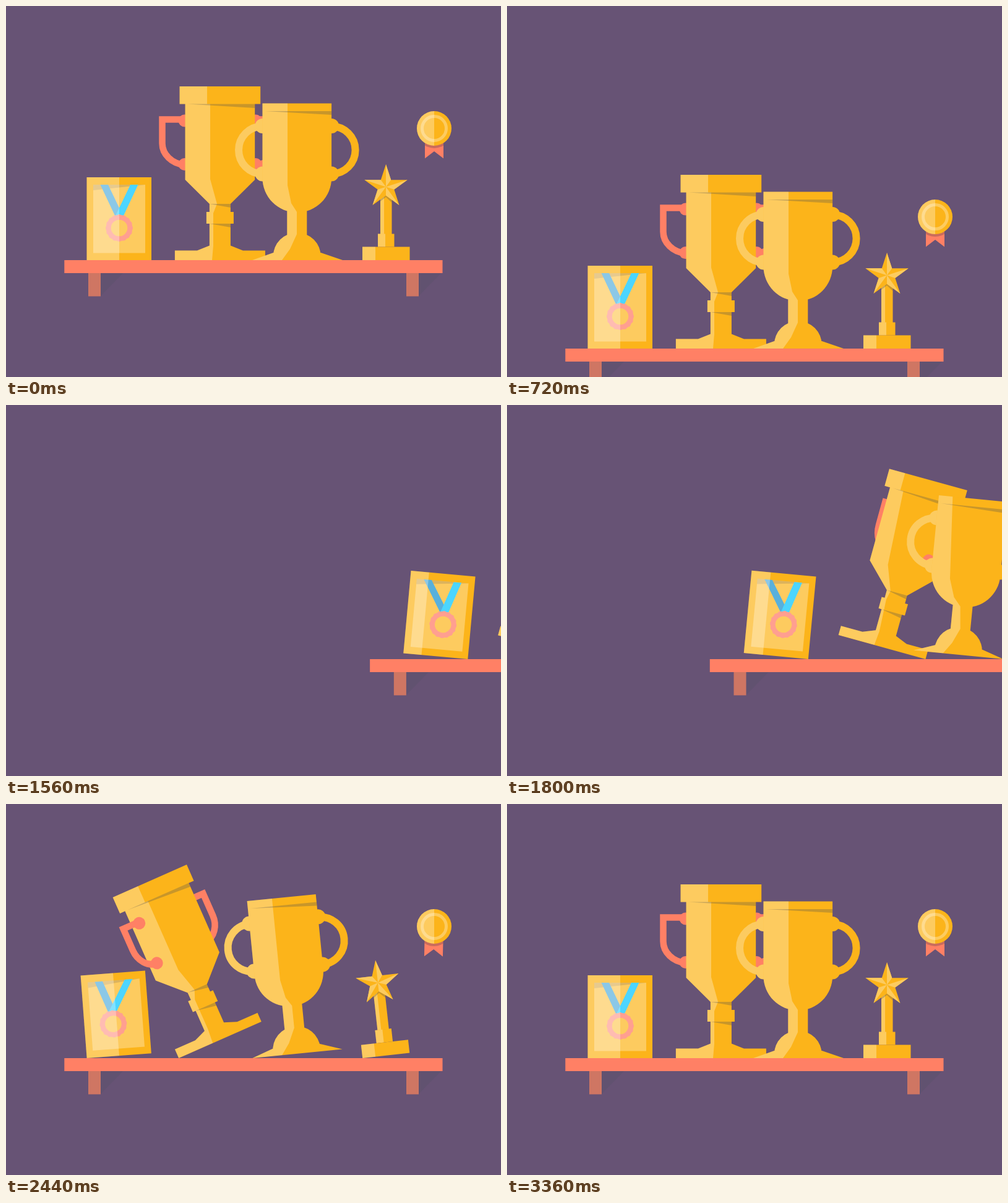
These frames come from a looping animation (800x600 px, 3400 ms). An HTML page with a canvas:

```html
<!DOCTYPE html>
<html lang="en">
<head>
<meta charset="utf-8">
<title>Trophy shelf</title>
<style>
html, body { margin: 0; width: 100%; height: 100%; overflow: hidden; background: #675375; }
canvas { display: block; }
</style>
</head>
<body>
<canvas id="stage" width="800" height="600"></canvas>
<script>
const ctx = document.getElementById('stage').getContext('2d');
const LOOP = 3400, STEP = 40, FLOOR = 411;
const BG = '#675375', GOLD = '#fcb41a', PALE = '#fccb60', CORAL = '#ff8065';
const GLOW = 'rgba(255,255,255,.3)', SHADE = 'rgba(80,80,80,.3)';
const TAU = Math.PI * 2, RAD = Math.PI / 180, SIDES = [-1, 1];

// Easing from (0,0) to (1,1) with level handles at x1 and x2
function ease(x1, x2) {
  return u => {
    let lo = 0, hi = 1;
    for (let i = 0; i < 24; i++) {
      const s = (lo + hi) / 2, r = 1 - s;
      if (3 * r * r * s * x1 + 3 * r * s * s * x2 + s ** 3 < u) lo = s; else hi = s;
    }
    return lo * lo * (3 - 2 * lo);
  };
}

const slideIn = ease(.53, .82), swing = ease(.42, .2);
const rock = ease(.6, .42), fall = ease(.3, .4), soft = ease(.4, .6);

const span = (t, a, b) => Math.min(1, Math.max(0, (t - a) / (b - a)));
const mix = (a, b, u) => a + (b - a) * u;

// Build up to a, cross over to b, then return to rest
function sway(t, a, b, cross, [c0, c1], back, [b0, b1]) {
  const start = a * soft(span(t, 1080, 1640));
  return mix(start, b, cross(span(t, c0, c1))) * (1 - back(span(t, b0, b1)));
}

function pose(t) {
  const drop = Math.max(0, t - 200) / STEP;
  if (t < 1000) {
    const still = { lean: 0, slide: 0 };
    return { x: 0, y: 12.85 * (Math.exp(.192 * drop) - 1), glow: 1, yaw: 0, hang: 0, tail: 0,
      frame: still, tall: still, round: still, star: still };
  }
  const item = (lean, slide, cross, when, back, rest, slideWhen = when) => ({
    lean: sway(t, lean[0], lean[1], cross, when, back, rest),
    slide: sway(t, slide, 0, cross, slideWhen, back, rest)
  });
  const late = span(t, 2000, 3360);
  return {
    x: 708 * (1 - slideIn(span(t, 1080, 2058))),
    y: 0,
    glow: mix(.56, 1, soft(span(t, 1680, 2360))),
    yaw: sway(t, 52, -41, soft, [2000, 2420], soft, [2640, 3300]),
    hang: 7 * Math.cos(late * TAU * 1.5) * Math.sqrt(1 - late),
    tail: sway(t, -24, 1.3, soft, [1900, 2320], soft, [2360, 3000]),
    frame: item([5.5, -5.6], 18.5, rock, [1760, 2330], fall, [2330, 2780], [1880, 2440]),
    tall: item([16, -24], 27, swing, [1740, 2500], slideIn, [2680, 3340]),
    round: item([5.6, -5.7], 25, rock, [1790, 2440], fall, [2460, 2980]),
    star: item([6.3, -6.3], 0, rock, [1930, 2440], fall, [2460, 3000])
  };
}

function addPoly(path, pts) {
  pts.forEach(([x, y], i) => i ? path.lineTo(x, y) : path.moveTo(x, y));
  path.closePath();
  return path;
}

function poly(color, ...pts) {
  ctx.fillStyle = color;
  ctx.fill(addPoly(new Path2D(), pts));
}

function box(color, x, y, w, h) {
  ctx.fillStyle = color;
  ctx.fillRect(x, y, w, h);
}

function disc(color, x, y, r) {
  ctx.fillStyle = color;
  ctx.beginPath();
  ctx.arc(x, y, r, 0, TAU);
  ctx.fill();
}

function ring(color, x, y, r, width, a = 0, b = TAU) {
  ctx.strokeStyle = color;
  ctx.lineWidth = width;
  ctx.beginPath();
  ctx.arc(x, y, r, a, b);
  ctx.stroke();
}

// A wedge of shadow under an overhang
const wedge = (x1, x2, y, h) => poly(SHADE, [x1, y], [x2, y], [x2, y + h]);

// Symmetric outline from half widths, top to bottom
function outline(cx, half) {
  const right = half.map(([w, y]) => [cx + w, y]);
  const left = half.map(([w, y]) => [cx - w, y]).reverse();
  return addPoly(new Path2D(), [...right, ...left]);
}

// Lit left part; its edge shifts most near the top
function shine(path, glow, edge) {
  const reach = y => 45 * Math.sqrt(span(y, 340, 150));
  const pts = edge.map(([x, y]) => [x - (1 - glow) * reach(y), y]);
  ctx.save();
  ctx.clip(path);
  poly(GLOW, [0, 0], [pts[0][0], 0], ...pts, [0, FLOOR]);
  ctx.restore();
}

// Rocks an item on whichever bottom corner is down
function stand(cx, half, { lean, slide }, draw) {
  const a = lean * RAD;
  ctx.save();
  ctx.translate(cx + slide, FLOOR - Math.abs(Math.sin(a)) * half);
  ctx.rotate(a);
  ctx.translate(-cx, -FLOOR);
  draw();
  ctx.restore();
}

function drawShelf() {
  for (const x of [133, 647]) {
    poly('#615270', [x + 20, 432], [x + 56, 432], [x + 20, 469]);
    box('#cf7663', x, 432, 20, 37.5);
  }
  box(CORAL, 94.3, FLOOR, 611.2, 21);
}

function drawFrame(glow, hang) {
  const cx = 183, x = cx + hang;
  box(GOLD, 130.5, 277, 104.5, 134);
  box(GLOW, 141, 289, 84, 110.5);
  poly('rgba(120,110,90,.25)', [141, 289], [225, 289], [141, 298]);
  for (const s of SIDES) {
    poly(s < 0 ? '#58b0dc' : '#4cd5ff',
      [cx + s * 18, 289], [cx + s * 30.5, 289], [x + s * 7, 339], [x - s * 6, 339]);
  }
  for (let i = 0; i < 16; i++) {
    const a = i * TAU / 16;
    disc('#ff9f90', x + Math.cos(a) * 18.5, 359 + Math.sin(a) * 18.5, 3.5);
  }
  ring('#ff9f90', x, 359, 17.3, 8);
  box(GLOW, 130.5, 277, 52.5 * glow, 134);
}

const tallPath = outline(345.9, [
  [65.3, 130], [65.3, 158.5], [56.3, 158.5], [56.3, 281], [17, 320], [17, 333], [22, 333],
  [22, 352], [17, 352], [17, 387.5], [37, 395.5], [73, 395.5], [73, FLOOR]
]);

function drawGrip(side, squeeze) {
  const x = d => 346 + side * d * squeeze;
  ctx.strokeStyle = CORAL;
  ctx.lineWidth = 10.5;
  ctx.beginPath();
  ctx.moveTo(x(57.5), 183.5);
  ctx.lineTo(x(93.5), 183.5);
  ctx.lineTo(x(93.5), 222);
  ctx.bezierCurveTo(x(93.5), 240, x(78), 255, x(57.5), 257);
  ctx.stroke();
  for (const y of [185.5, 256]) disc(CORAL, x(57.5), y, 10);
}

function drawTall(glow, yaw) {
  const grips = front => SIDES.filter(s => (s * yaw > .01) === front)
    .forEach(s => drawGrip(s, Math.cos(yaw * RAD)));
  grips(false);
  ctx.fillStyle = GOLD;
  ctx.fill(tallPath);
  shine(tallPath, glow, [
    [325, 158.5], [330, 158.5], [330, 280], [341, 320], [335, 335], [335, 387.5], [333, FLOOR]
  ]);
  wedge(294, 402.2, 158.5, 6.5);
  wedge(329, 363, 320, 6);
  wedge(329, 363, 352, 6);
  grips(true);
}

function makeRound() {
  const cx = 470.3, path = new Path2D();
  path.rect(414.5, 157.5, 111.6, 121);
  path.ellipse(cx, 278, 55.8, 56, 0, 0, TAU / 2);
  path.rect(cx - 16, 320, 32, 60);
  path.moveTo(cx - 38.5, 405);
  path.arc(cx, 405, 38.5, TAU / 2, TAU);
  return addPoly(path, [[432, 399], [509, 399], [544, FLOOR], [398, FLOOR]]);
}
const roundPath = makeRound();

function drawRound(glow) {
  for (const s of SIDES) {
    const x = 470.3 + s * 55.8, color = s < 0 ? PALE : GOLD;
    ring(color, x, 233, 38.5, 12, -s * TAU / 4, -s * TAU / 4 + TAU / 2);
    for (const y of [194, 271.5]) disc(color, x, y, 12);
  }
  ctx.fillStyle = GOLD;
  ctx.fill(roundPath);
  shine(roundPath, glow, [
    [455, 157.5], [455, 290], [461, 319], [470, 333], [470, 369], [459, 393], [446, FLOOR]
  ]);
  wedge(419, 526, 170, 6);
}

function drawStar(glow) {
  const block = (x, y, w, h, lit) => {
    box(GOLD, x, y, w, h);
    box(GLOW, x, y, lit * glow, h);
  };
  block(605, 305, 18.5, 64, 6);
  block(601, 368.5, 26.5, 21, 12);
  block(576, 389.5, 76.5, 21.5, 21);
  poly(SHADE, [605, 305], [623.5, 305], [623.5, 318], [614, 309], [605, 316]);
  const mid = [614, 292.5];
  const spot = i => {
    const r = i % 2 ? 14 : 36.5, a = i * TAU / 10;
    return [mid[0] + Math.sin(a) * r, mid[1] - Math.cos(a) * r];
  };
  poly(GOLD, ...Array.from({ length: 10 }, (_, i) => spot(i)));
  for (let i = 0; i < 10; i += 2) poly(PALE, mid, spot(i), spot(i + 1));
}

function drawBadge(glow, tail) {
  ctx.save();
  ctx.translate(692, 198);
  ctx.save();
  ctx.rotate(tail * RAD);
  const ribbon = addPoly(new Path2D(), [[-15, 8], [15, 8], [15, 48.5], [0, 37], [-15, 48.5]]);
  ctx.fillStyle = CORAL;
  ctx.fill(ribbon);
  ctx.clip(ribbon);
  disc('rgba(80,60,70,.3)', 0, 4, 28);
  ctx.restore();
  disc(GOLD, 0, 0, 28);
  ring(GLOW, 0, 0, 19.5, 5);
  ctx.beginPath();
  ctx.arc(0, 0, 28, 0, TAU);
  ctx.clip();
  box(GLOW, -28, -28, 28 * glow, 56);
  ctx.restore();
}

function render(t) {
  box(BG, 0, 0, 800, 600);
  if (t >= 960 && t < 1120) return;
  const p = pose(t);
  ctx.save();
  ctx.translate(p.x, p.y);
  drawShelf();
  stand(182.75, 52.25, p.frame, () => drawFrame(p.glow, p.hang));
  stand(346, 73, p.tall, () => drawTall(p.glow, p.yaw));
  stand(471, 73, p.round, () => drawRound(p.glow));
  stand(614.25, 38.25, p.star, () => drawStar(p.glow));
  drawBadge(p.glow, p.tail);
  ctx.restore();
}

function tick() {
  const t = performance.now() % LOOP;
  render(Math.floor(t / STEP) * STEP);
  requestAnimationFrame(tick);
}
tick();
</script>
</body>
</html>
```
